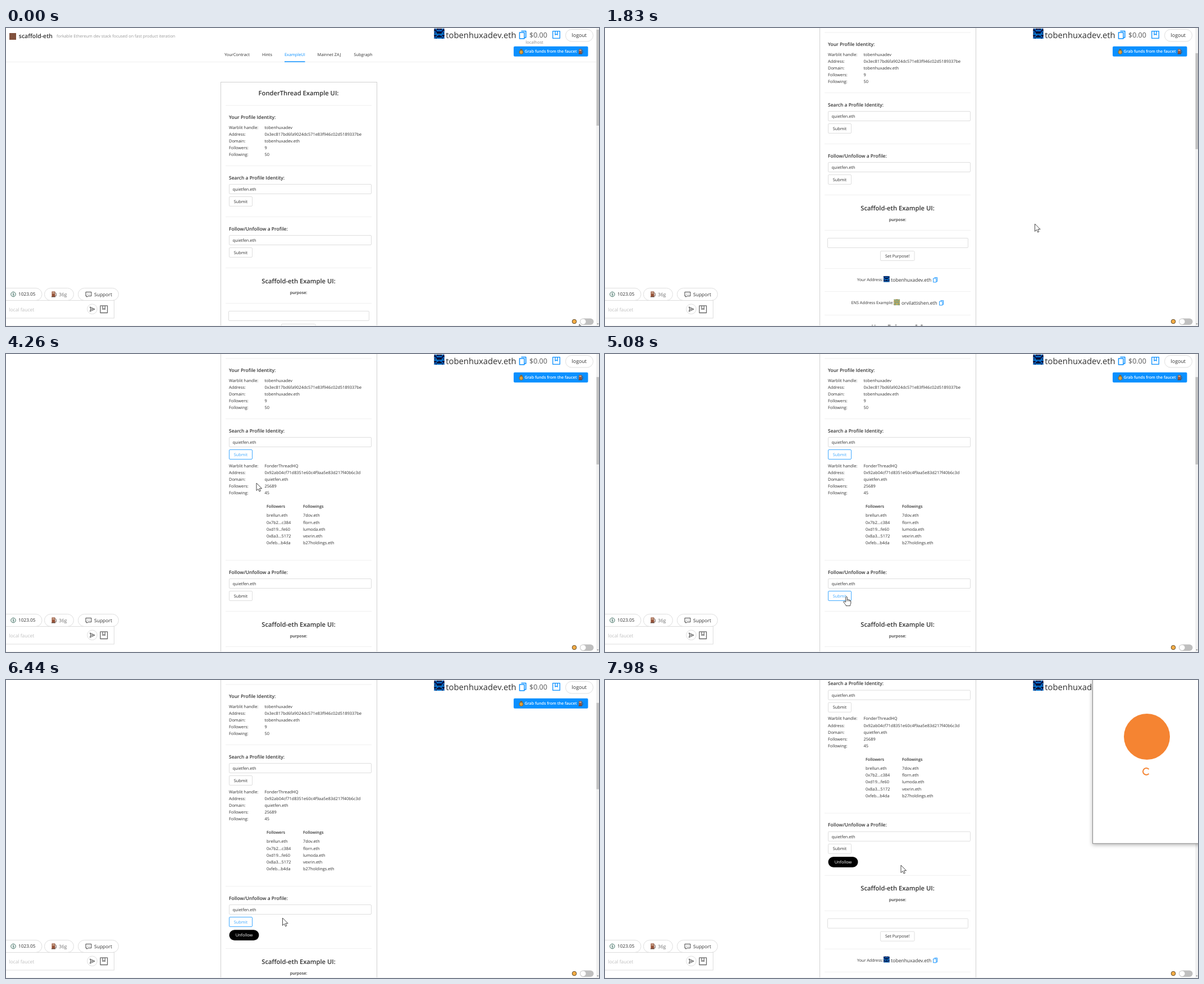
These frames come from a looping animation (1056 px wide and 531 px high, 8000 ms). An HTML page:

```html
<!DOCTYPE html>
<html lang="en">
<head>
<meta charset="utf-8">
<title>Example UI walkthrough</title>
<style>
html, body { margin: 0; width: 100%; height: 100%; overflow: hidden; background: #fff; }
svg { display: block; width: 1056px; height: 531px; }
text { font-family: "Open Sans", "Noto Sans", sans-serif; text-rendering: geometricPrecision; white-space: pre; }
.button rect { fill: #fff; stroke: #dedede; }
.button text { fill: #303030; }
.button.active rect { stroke: #40a9ff; }
.button.active text { fill: #40a9ff; }
.button.loading { opacity: .65; }
.button .spinner { display: none; }
.button.loading .spinner { display: inline; }
.field.hover { stroke: #40a9ff; }
</style>
</head>
<body>
<svg id="stage" viewBox="0 0 1056 531"></svg>
<script>
const INK = '#303030', BLUE = '#0a90ff', LINE = '#dedede';
const USER = 'tobenhuxadev', TARGET = 'quietfen.eth', BRAND = 'FonderThread';

// y is the optical middle of the line
const text = (x, y, str, size = 7.4, fill = INK, weight = 400, anchor = 'start') =>
  `<text x="${x}" y="${y + size * .36}" font-size="${size}" fill="${fill}" font-weight="${weight}" text-anchor="${anchor}">${str}</text>`;
const middle = (x, y, str, size, fill, weight) => text(x, y, str, size, fill, weight, 'middle');
const rect = (x, y, w, h, fill, stroke = 'none', r = 0, extra = '') =>
  `<rect x="${x}" y="${y}" width="${w}" height="${h}" rx="${r}" fill="${fill}" stroke="${stroke}" ${extra}/>`;
const circle = (x, y, r, fill, stroke = 'none') =>
  `<circle cx="${x}" cy="${y}" r="${r}" fill="${fill}" stroke="${stroke}"/>`;
const path = (d, stroke, width = 1, fill = 'none') =>
  `<path d="${d}" fill="${fill}" stroke="${stroke}" stroke-width="${width}" stroke-linejoin="round"/>`;
const group = (id, content) => `<g id="${id}">${content}</g>`;
const divider = y => rect(391, y - .5, 260, 1, '#f0f0f0');
const field = (x, y, w, id) => rect(x + .5, y + .5, w - 1, 17, '#fff', LINE, 1.5, `id="${id}" class="field"`);
const arc = (x, y, r, width, color) =>
  path(`M${x + r * .75} ${y - r * .66}A${r} ${r} 0 1 0 ${x + r * .75} ${y + r * .66}`, color, width);

const button = (id, x, y, w, label) =>
  `<g id="${id}" class="button">${rect(x + .5, y + .5, w - 1, 17, '#fff', LINE, 1.5)}
   <g class="spinner">${arc(x + 12, y + 9, 3.2, .9, '#40a9ff')}</g>
   ${middle(x + w / 2, y + 9, label)}</g>`;

const rows = (y, values) => ['Warblit handle:', 'Address:', 'Domain:', 'Followers:', 'Following:']
  .map((label, i) => text(397, y + i * 12.2, label) + text(460.5, y + i * 12.2, values[i])).join('');

const column = (x, title, names) => text(x, 401.3, title, 7.2, INK, 600) +
  names.map((name, i) => text(x, 417.7 + i * 12.2, name)).join('');

// Mirrored 8x8 avatar from four columns per row
const avatar = (x, y, size, colors, pattern) => {
  const s = size / 8;
  let out = rect(x, y, size, size, colors[0]);
  pattern.split(' ').forEach((row, j) => [...row, ...[...row].reverse()].forEach((c, i) => {
    if (+c) out += rect(x + i * s, y + j * s, s + .1, s + .1, colors[c]);
  }));
  return out;
};
const userAvatar = (x, y, size) => avatar(x, y, size, ['#06195c', '#0878cf', '#080c24'],
  '0120 2011 1000 0122 1111 2010 0122 1011');
const copyIcon = (x, y, s) => `<g transform="translate(${x} ${y}) scale(${s})">` +
  path('M4 1H12.3V12.5H10M1 3.5H9.5V14.5H1Z', BLUE, 1.5) + '</g>';
const walletIcon = (x, y, color) =>
  path(`M${x + .7} ${y + .7}h12.6v12.6h-12.6zM${x + 5} ${y + 1}v6.3l2-1.3 2 1.3v-6.3`, color, 1.3);
const pump = (x, y, s = 1) => `<g transform="translate(${x} ${y}) scale(${s})">` +
  rect(0, 0, 6, 9.5, '#965339') + rect(1, 1.2, 4, 2.6, '#c9a68e') + rect(-.6, 9, 7.2, 1, '#4b3731') +
  path('M6 2l1.8 1.3v4.5H6', '#54423d', .9) + '</g>';

const header =
  rect(6, 9, 12, 12, '#81513d') +
  text(22.8, 14.5, 'scaffold-eth', 10.5, INK, 600) +
  text(90, 14, 'forkable Ethereum dev stack focused on fast product iteration', 7.35, '#999') +
  text(925.3, 24.8, 'localhost', 7.5, '#8c8c8c') +
  [[389, 'YourContract'], [456, 'Hints'], [496, 'ExampleUI'], [554.5, 'Mainnet ZAJ'], [619.5, 'Subgraph']]
    .map(([x, label], i) => text(x, 47, label, 7.35, i === 2 ? BLUE : INK)).join('') +
  rect(0, 60, 1051, 1, '#f0f0f0') + rect(496, 59.3, 36.5, 1.5, BLUE);

const profile =
  middle(521, 115.7, BRAND + ' Example UI:', 11.2, INK, 600) + divider(138) +
  text(397, 159, 'Your Profile Identity:', 8.45, INK, 600) +
  rows(177, [USER, '0x3ec817bd6fa9024dc571e83f946c02d5189337be', USER + '.eth', 9, 50]) + divider(245.5) +
  text(397, 266.7, 'Search a Profile Identity:', 8.45, INK, 600) +
  field(397, 278, 254, 'searchField') + text(403.5, 287.2, TARGET) +
  button('search', 397, 300, 42, 'Submit');

const results =
  rows(329, [BRAND + 'HQ', '0x92ab04cf71d8351e60c4f9aa5e83d217f40b6c3d', TARGET, 25689, 45]) +
  column(464, 'Followers', ['brellun.eth', '0x7b2...c384', '0xd19...fe60', '0x8a3...5172', '0xfeb...b4da']) +
  column(529, 'Followings', ['7dov.eth', 'florn.eth', 'lumoda.eth', 'vexrin.eth', 'b27holdings.eth']);

const follow =
  divider(336.5) + text(397, 357.5, 'Follow/Unfollow a Profile:', 8.5, INK, 600) +
  field(397, 369, 254, 'followField') + text(403.5, 378.2, TARGET) +
  button('submit', 397, 391, 42, 'Submit') +
  group('unfollow', rect(397.5, 414.2, 53, 18.8, '#000', 'none', 9.4) + middle(424, 423.5, 'Unfollow', 7.4, '#fff'));

const rest =
  divider(427.5) + middle(521, 450.6, 'Scaffold-eth Example UI:', 11.2, INK, 600) +
  middle(521, 471, 'purpose:', 7.2, INK, 600) + divider(490.5) +
  field(396, 504, 251, 'purposeField') + button('purpose', 490, 527, 61.5, 'Set Purpose!') + divider(558.5) +
  text(449, 578.3, 'Your Address:', 7.2) + userAvatar(496, 572, 10.5) +
  text(509.3, 579.3, USER + '.eth', 8.5) + copyIcon(584, 574, .62) + divider(599.5) +
  text(438.5, 619.4, 'ENS Address Example:', 7.25) +
  avatar(514.5, 613.5, 10.5, ['#d2ad4f', '#67aaa0', '#a67d45'], '1012 0110 2001 0120 1011 0200 1010 2110') +
  text(528, 620.3, 'orvilattishen.eth', 8.4) + copyIcon(595, 615, .62) + divider(641.5) +
  middle(521, 663, 'Your Balance: 0.0', 11.2, INK, 600) + divider(690);

const pill = (x, w) => rect(x, 463.5, w, 22, '#fff', LINE, 11);
const overlay =
  userAvatar(762.5, 1, 18) + text(783.3, 12.5, USER + '.eth', 14.8) +
  copyIcon(913.5, 4.5, 1) + text(932, 12.3, '$0.00', 12.5, '#595959') + walletIcon(973, 5, BLUE) +
  rect(996.5, 2.5, 49, 21.5, '#fff', LINE, 10.7) + middle(1020.8, 13, 'logout', 8.9) +
  rect(904, 32.8, 132.5, 18, BLUE, 'none', 2) +
  circle(917.5, 43, 3.5, '#dca13a', '#865e2b') + rect(915.5, 37.5, 4, 2, '#865e2b') +
  text(923.5, 41.7, 'Grab funds from the faucet', 7.1, '#fff', 600) + pump(1020, 37.5, .9) +
  pill(-10, 74) + circle(13, 474.5, 4.2, '#fff', '#34675a') + middle(13, 474.5, '$', 6.5, '#34675a', 600) +
  text(22, 474.5, '1023.05', 8.25) +
  pill(68.5, 52) + pump(81.5, 469.5) + text(94, 474.7, '36g', 8.6, '#737373') +
  pill(128.5, 72) + path('M142 470.5h10v7h-6l-2 2v-2h-2z', INK, .9) +
  [144.6, 147, 149.4].map(x => circle(x, 474, .6, INK)).join('') + text(157, 474.7, 'Support', 8.5) +
  rect(-1, 485.5, 193.5, 31.5, '#fff', LINE) + text(5.3, 501.7, 'local faucet', 8.5, '#bfbfbf') +
  circle(153.5, 500.8, 8.8, '#fff', LINE) + path('M149.5 497l8.5 4-8.5 4 1.5-4zM151 501h4', INK, .9) +
  walletIcon(167.3, 494.2, '#666') +
  circle(1012, 523, 3.8, '#f5ad45', '#5e4a2b') +
  rect(1022, 517.5, 24.5, 11.5, '#bfbfbf', 'none', 5.75) + circle(1027.7, 523.2, 4.8, '#fff') +
  rect(0, 530, 1056, 1, '#f3f3f3') +
  rect(1051, 0, 5, 531, '#f1f1f1') + rect(1051.5, 0, 4.5, 10, '#c1c1c1', 'none', 0, 'id="thumb"') +
  path('M1052.3 526.5h3l-1.5 2z', 'none', 0, '#777');

const popup =
  rect(868.5, -5, 200, 296.3, '#fff', '#8a8a8a', 0, 'filter="url(#shadow)"') +
  circle(965, 101, 41, '#f58432') + group('loader', arc(964, 163, 6, 2, '#f58432'));

const ARROW = path('M0 0V13.4L3.1 10.5 5.2 15 7.3 14 5.3 9.7H9.6Z', '#333', .9, '#fff');
const HAND = path('M-1.3 1.2Q0-.7 1.3 1.2V5.6Q2.8 4.8 4 6.2 5.6 5.5 6.2 7 7.7 6.8 7.8 8.8V12Q7.6 14 6.6 15V16.7H-1V15.3Q-3.4 13-5.3 9.7-4.7 7.6-1.3 10.2ZM1.3 5.6V8.6M4 6.2V8.8M6.2 7V9', '#333', .9, '#fff');

const stage = document.getElementById('stage');
stage.innerHTML =
  '<defs><filter id="shadow"><feDropShadow dx="0" dy="2" stdDeviation="3.5" flood-opacity=".3"/></filter></defs>' +
  group('page', header + rect(382.5, 96.5, 278, 2000, '#fff', '#d0d0d0') + profile +
    group('results', results) + group('follow', follow) + group('rest', rest)) +
  overlay + group('popup', popup) + group('cursor', group('arrow', ARROW) + group('hand', HAND));

const $ = id => document.getElementById(id);
const show = (id, on) => { $(id).style.display = on ? '' : 'none'; };
const move = (id, x, y) => $(id).setAttribute('transform', `translate(${x} ${y})`);
const within = (n, from, to) => n >= from && n < to;
const ease = (n, from, to) => {
  const p = Math.min(1, Math.max(0, (n - from) / (to - from)));
  return p * p * (3 - 2 * p);
};

const STEP = 67.6, DURATION = 8000;
// [step, x, y]
const CURSOR = [
  [0, 1021, 528], [5, 765.5, 349], [33, 765.5, 349], [46, 429, 187], [47, 424.5, 182],
  [56, 424.5, 182], [63, 446, 230], [75, 430, 432], [88, 430, 432], [95, 492.5, 424],
  [98, 492.5, 424], [105, 427.5, 342], [107, 427.5, 342], [109, 425, 328], [112, 425, 328], [118, 527, 330]
];

function cursorAt(n) {
  const i = Math.max(1, CURSOR.findIndex(key => key[0] >= n));
  const [n0, x0, y0] = CURSOR[i - 1], [n1, x1, y1] = CURSOR[i];
  const p = ease(n, n0, n1);
  return [x0 + (x1 - x0) * p, y0 + (y1 - y0) * p];
}

function setButton(id, active, loading, n) {
  const el = $(id);
  el.classList.toggle('active', active);
  el.classList.toggle('loading', loading);
  el.querySelector('rect').setAttribute('width', loading ? 53.5 : 41);
  const label = el.querySelector('text');
  label.setAttribute('x', loading ? 430.5 : 418);
  const cy = +label.getAttribute('y') - 2.7;
  el.querySelector('.spinner').setAttribute('transform', `rotate(${n * 24} 409 ${cy})`);
}

function render(time) {
  const n = Math.min(118, Math.floor(time / STEP));
  const found = n >= 59, following = n >= 88;
  const shift = found ? 161 : 0, extra = following ? 20 : 0;
  const scroll = 130 * ease(n, 23, 27) + 130.3 * ease(n, 98, 102);
  const [x, y] = cursorAt(n);

  move('page', 0, -scroll);
  move('follow', 0, shift);
  move('rest', 0, shift + extra);
  show('results', found);
  show('unfollow', following);
  setButton('search', within(n, 53, 88), within(n, 54, 59), n);
  setButton('submit', within(n, 74, 112), within(n, 78, 88), n);
  $('followField').classList.toggle('hover', within(n, 60, 75) && y > 400 && y < 418);

  const height = 1630 + shift + extra;
  $('thumb').setAttribute('y', 3 + 525 * scroll / height);
  $('thumb').setAttribute('height', 525 * 531 / height);

  show('popup', n >= 114);
  $('loader').setAttribute('transform', `rotate(${(n - 118) * 32} 964 163)`);

  const pointing = within(n, 47, 58) || within(n, 75, 89) || within(n, 109, 113);
  move('cursor', x, y);
  show('hand', pointing);
  show('arrow', !pointing);
}

let start;
function tick(now) {
  start ??= now;
  render((now - start) % DURATION);
  requestAnimationFrame(tick);
}
render(0);
requestAnimationFrame(tick);
</script>
</body>
</html>
```
